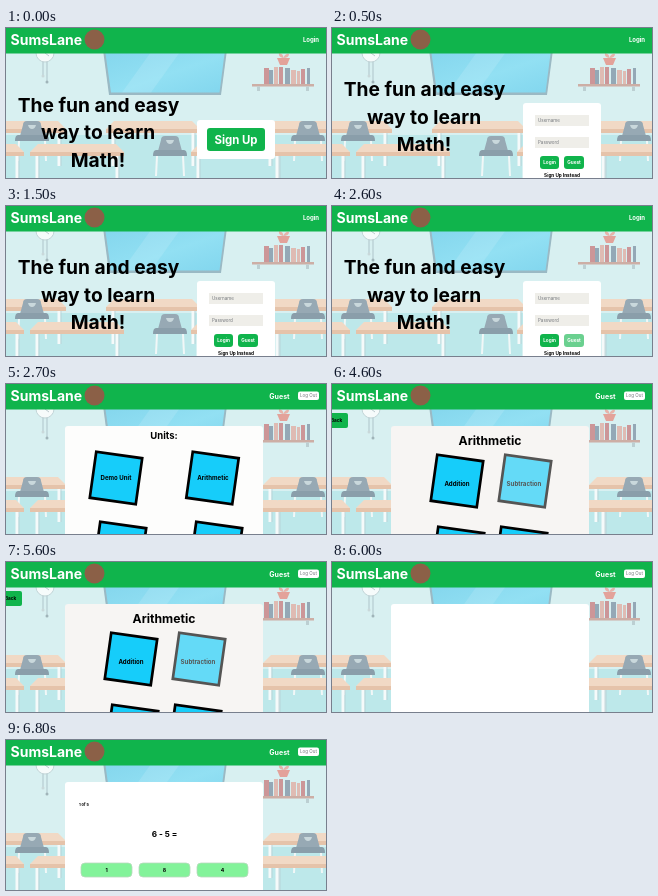
An HTML page that plays this animation: 320x150 px, repeating every 6.9 s.

```html
<!DOCTYPE html>
<html lang="en">
<head>
<meta charset="utf-8">
<title>SumsLane</title>
<style>
html, body { margin: 0; width: 100%; height: 100%; overflow: hidden; background: #d8f0f1; }
svg { display: block; width: 100vw; height: 100vh; }
text { font-family: Inter, "Open Sans", sans-serif; font-weight: 700; fill: #000; }
.mid { text-anchor: middle; }
.white { fill: #fff; }
.head { font-size: 19.2px; }
.label { font-size: 6.1px; }
.small { font-size: 4.7px; }
.hint { font-size: 4.5px; font-weight: 400; fill: #74777c; }
.green { fill: #10b44c; }
.tile { fill: #16cdfa; stroke: #000; stroke-width: 2.7; }

/* Scenes switch without blending over one 6.9 s loop */
.scene { visibility: hidden; animation: 6.9s step-end infinite; }
.hover { animation: 6.9s linear infinite; }
#landing { animation-name: landing; }
#form { animation-name: form; }
#visitor { animation-name: visitor; }
#user { animation-name: user; }
#units { animation-name: units; }
#topics { animation-name: topics; }
#quiz { animation-name: quiz; }
#question { animation-name: question; }
#sign { animation-name: sign; }
#guest { animation-name: guest; }
#arith { animation-name: arith; }
@keyframes landing { 0% { visibility: visible } 7.2464%, 100% { visibility: hidden } }
@keyframes form { 0% { visibility: hidden } 7.2464% { visibility: visible } 39.1304%, 100% { visibility: hidden } }
@keyframes visitor { 0% { visibility: visible } 39.1304%, 100% { visibility: hidden } }
@keyframes user { 0% { visibility: hidden } 39.1304%, 100% { visibility: visible } }
@keyframes units { 0% { visibility: hidden } 39.1304% { visibility: visible } 66.6667%, 100% { visibility: hidden } }
@keyframes topics { 0% { visibility: hidden } 66.6667% { visibility: visible } 86.9565%, 100% { visibility: hidden } }
@keyframes quiz { 0% { visibility: hidden } 86.9565%, 100% { visibility: visible } }
@keyframes question { 0% { visibility: hidden } 92.7536%, 100% { visibility: visible } }
@keyframes sign { 0%, 1% { opacity: 1 } 4.3478%, 100% { opacity: .65 } }
@keyframes guest { 0%, 35.5% { opacity: 1 } 37.6%, 100% { opacity: .62 } }
@keyframes arith { 0%, 60.8% { opacity: 1 } 61%, 100% { opacity: .65 } }
</style>
</head>
<body>
<svg viewBox="0 0 320 150" preserveAspectRatio="none">
<defs>
  <linearGradient id="glass" x2="1" y2="1">
    <stop offset="0" stop-color="#84d6ed"/><stop offset=".55" stop-color="#92e0f3"/><stop offset="1" stop-color="#82d6ee"/>
  </linearGradient>
  <g id="chair">
    <path d="M-9 2Q-9-2-5-2H5Q9-2 9 2L12 13H-12Z" fill="#97a9b4"/>
    <path d="M-4 2H4Q3 6 0 6T-4 2Z" fill="#c9d8dc"/>
    <path d="M-14 12H14Q17 12 17 18H-17Q-17 12-14 12Z" fill="#8a9eaa"/>
    <path d="M-13 18L-14 38M13 18L14 38" stroke="#f1f7f7" stroke-width="2"/>
  </g>
  <g id="desk">
    <path d="M8 0H86L94 8H0Z" fill="#f1d9c5"/>
    <path d="M0 8H94V12H0Z" fill="#e5c3aa"/>
    <path d="M7 12V45M87 12V45" stroke="#f5fafa" stroke-width="3"/>
    <path d="M9 12V45M89 12V45" stroke="#b5cad0" stroke-width=".7"/>
  </g>
  <g id="shelf">
    <path d="M8 15H13V31H8ZM23 14H27V31H23ZM45 16H49V31H45Z" fill="#cc9698"/>
    <path d="M13 17H17V31H13ZM29 15H34V31H29ZM51 15H54V31H51Z" fill="#94a8b6"/>
    <path d="M18 14H22V31H18ZM35 17H40V31H35ZM41 18H44V31H41Z" fill="#dfbbb3"/>
    <path d="M-4 31H58V33.500H-4Z" fill="#cdaea5"/>
    <path d="M1 33.500H4V38H1ZM50 33.500H53V38H50Z" fill="#bccfd2"/>
    <path d="M21 5H34L31 12H24Z" fill="#e3a29a"/>
    <path d="M27 5Q22 4 23 0Q28 1 27 5Q30 0 33 1Q33 5 27 5" fill="#e6b3aa"/>
  </g>
  <rect id="tile" class="tile" x="-23.200" y="-23.200" width="46.400" height="46.400" transform="rotate(8)"/>
</defs>

<g id="room">
  <path d="M0 25H320V150H0Z" fill="#d8f0f1"/>
  <path d="M0 107H320V150H0Z" fill="#bde8ea"/>
  <path d="M97 22H221L215 67H103Z" fill="#9ab9c4"/>
  <path d="M99 22H219L213.500 64.500H105Z" fill="url(#glass)"/>
  <path d="M145 24H174L145 64.500H116Z" fill="#fff" opacity=".12"/>
  <circle cx="39" cy="25" r="9" fill="#f6fbfb" stroke="#c3d5d8"/>
  <path d="M39 19V25L43 28M37 34V48M41 34V53" fill="none" stroke="#a0b4b9" stroke-width=".7"/>
  <circle cx="37" cy="48" r="1.500" fill="#c9d8da"/><circle cx="41" cy="54" r="1.500" fill="#a0b4b9"/>
  <use href="#shelf" x="250" y="25"/>
  <use href="#desk" x="-34" y="93"/><use href="#desk" x="100" y="93"/><use href="#desk" x="257" y="93"/>
  <use href="#chair" x="26" y="95"/><use href="#chair" x="302" y="95"/>
  <use href="#desk" x="-76" y="116"/><use href="#desk" x="24" y="116"/>
  <use href="#desk" x="185" y="116"/><use href="#desk" x="264" y="116"/>
  <use href="#chair" x="164" y="110"/>
</g>

<g id="landing" class="scene">
  <g class="mid">
    <text class="head" x="92.500" y="83.500">The fun and easy</text>
    <text class="head" x="92" y="111">way to learn</text>
    <text class="head" x="92" y="138.700">Math!</text>
  </g>
  <rect class="white" x="191" y="92" width="78" height="39" rx="3"/>
  <g id="sign" class="hover">
    <rect class="green" x="201" y="100" width="58" height="23" rx="3"/>
    <text class="mid white" x="230" y="115.500" font-size="11.400">Sign Up</text>
  </g>
</g>
<g id="form" class="scene">
  <g class="mid">
    <text class="head" x="92.500" y="68">The fun and easy</text>
    <text class="head" x="92" y="95.500">way to learn</text>
    <text class="head" x="92" y="123">Math!</text>
  </g>
  <rect class="white" x="191" y="75" width="78" height="80" rx="3"/>
  <path d="M203 87H257V98H203ZM203 109H257V120H203Z" fill="#efeee9"/>
  <text class="hint" x="206" y="94.300">Username</text>
  <text class="hint" x="206" y="116.300">Password</text>
  <rect class="green" x="208" y="128" width="19" height="13" rx="3"/>
  <text class="mid white small" x="217.500" y="136.300">Login</text>
  <g id="guest" class="hover">
    <rect class="green" x="232" y="128" width="20" height="13" rx="3"/>
    <text class="mid white small" x="242" y="136.300">Guest</text>
  </g>
  <text class="mid small" x="230" y="148.500">Sign Up Instead</text>
</g>

<g id="units" class="scene">
  <rect x="59" y="42" width="198" height="115" rx="3" fill="#fdfdfc"/>
  <text class="mid" x="158" y="54.800" font-size="9.500">Units:</text>
  <use href="#tile" x="110" y="94"/>
  <text class="mid label" x="110" y="96">Demo Unit</text>
  <g id="arith" class="hover">
    <use href="#tile" x="206.500" y="94"/>
    <text class="mid label" x="207" y="96">Arithmetic</text>
  </g>
  <use href="#tile" x="114" y="164"/><use href="#tile" x="210" y="164"/>
</g>
<g id="topics" class="scene">
  <rect x="59" y="42" width="198" height="115" rx="3" fill="#f7f5f3"/>
  <rect class="green" x="-15" y="29" width="31" height="15" rx="2"/>
  <text x="-1" y="38.300" font-size="4.700">Back</text>
  <text class="mid" x="158" y="61" font-size="12.200">Arithmetic</text>
  <use href="#tile" x="125" y="97"/>
  <text class="mid label" x="125" y="101.800">Addition</text>
  <g opacity=".65">
    <use href="#tile" x="193" y="97"/>
    <text class="mid label" x="192" y="101.800">Subtraction</text>
  </g>
  <use href="#tile" x="126" y="169"/><use href="#tile" x="189" y="169"/>
</g>
<g id="quiz" class="scene">
  <rect class="white" x="59" y="42" width="198" height="115" rx="3"/>
</g>
<g id="question" class="scene">
  <text x="73" y="65.500" font-size="3.900">1 of 5</text>
  <text class="mid" x="158.500" y="97" font-size="8.200">6 - 5 =</text>
  <g fill="#83f39a" stroke="#b8d9bd" stroke-width=".8">
    <rect x="75" y="123" width="51" height="14" rx="4"/>
    <rect x="133" y="123" width="51" height="14" rx="4"/>
    <rect x="191" y="123" width="51" height="14" rx="4"/>
  </g>
  <g class="mid" font-size="5.200">
    <text x="100.500" y="132">1</text><text x="158.500" y="132">8</text><text x="216.500" y="132">4</text>
  </g>
</g>

<path class="green" d="M0 0H320V25.500H0Z"/>
<text class="white" x="4.500" y="17" font-size="14">SumsLane</text>
<circle cx="88.500" cy="11.500" r="10" fill="#8b6047"/>
<g id="visitor" class="scene">
  <text class="white mid" x="305" y="14.200" font-size="6">Login</text>
</g>
<g id="user" class="scene">
  <text class="white mid" x="273.500" y="14.500" font-size="7">Guest</text>
  <rect class="white" x="292" y="7.500" width="21" height="8.500" rx="2"/>
  <text class="mid hint" x="302.500" y="13.400">Log Out</text>
</g>
</svg>
</body>
</html>
```
